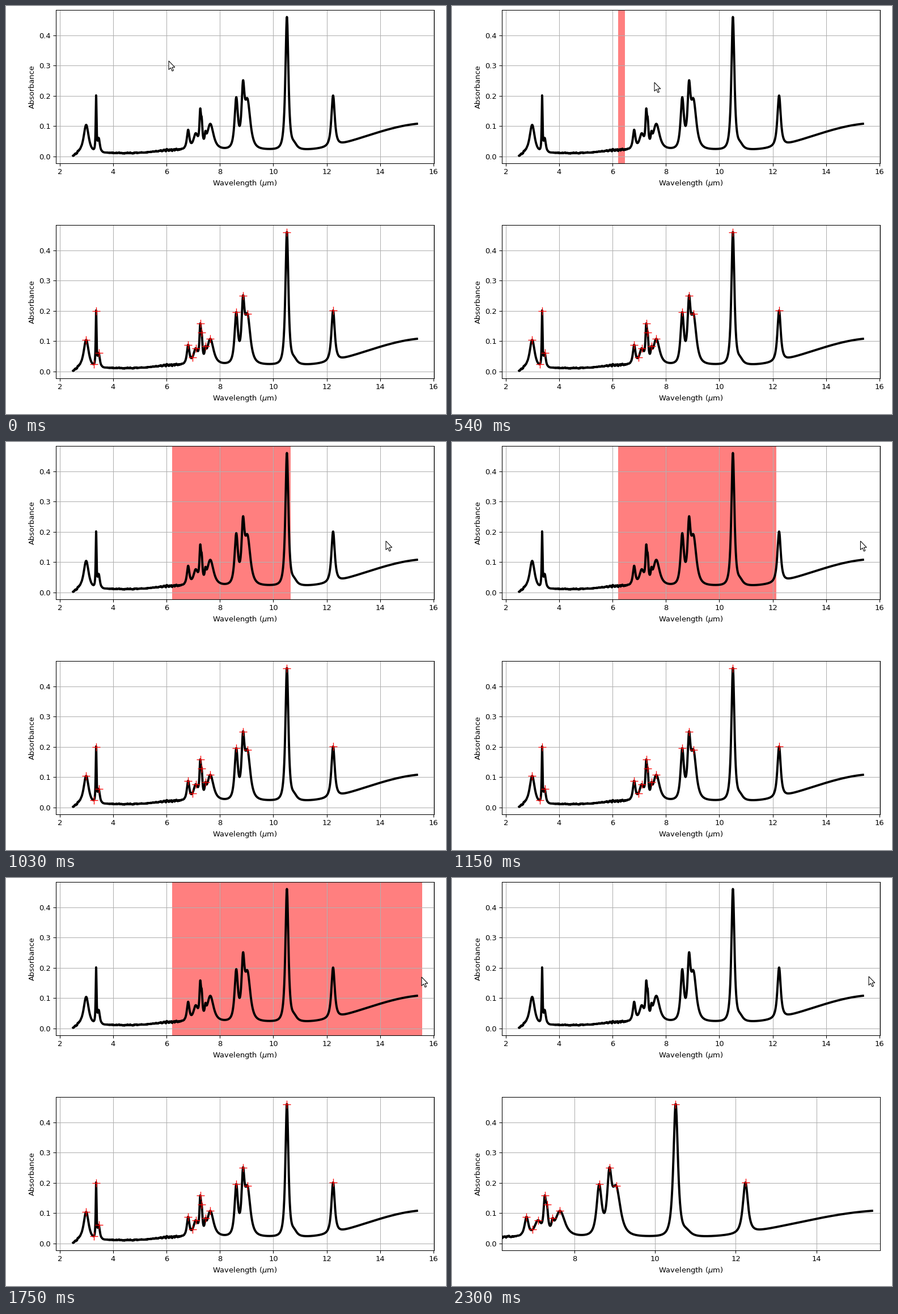
Recreate the animation shown at these times as a matplotlib script. Size 776 by 721 pixels, loop 2970 ms.

```python
import numpy as np
import matplotlib.pyplot as plt
from matplotlib.animation import FuncAnimation
from matplotlib.patches import Polygon
from matplotlib.ticker import MultipleLocator

W, H, DPI = 776, 721, 94
LOOP, STEP = 2970, 30
FULL, ZOOM = (1.856, 16.024), (6.2, 15.58)
PRESS, RELEASE = 480, 1830

plt.rcParams["font.family"] = "DejaVu Sans"

# Absorption bands: centre, absorbance there, half width
BANDS = np.array([
    (2.99, .104, .11), (3.363, .2015, .018), (3.46, .061, .05),
    (6.81, .088, .055), (7.093, .0765, .1), (7.262, .158, .033),
    (7.318, .129, .033), (7.458, .084, .03), (7.641, .1075, .14),
    (8.612, .1955, .072), (8.865, .2505, .062), (9.034, .191, .125),
    (10.51, .4605, .066), (12.24, .201, .073), (10.78, .05, .12),
])
DIPS = [3.28, 6.966]


def band(x, centre, width):
    """Bell of unit height, between a Gaussian and a Lorentzian."""
    u = (x - centre) / width
    return (1 + (2 ** (2 / 3) - 1) * u * u) ** -1.5


def hump(x, centre, width):
    return np.exp(-((x - centre) / width) ** 2)


def baseline(x):
    start = .011 * np.clip((x - 2.5) / .2, 0, 1)
    rise = .011 / (1 + np.exp((5.6 - x) / .25))
    ramp = .044 * (1 - np.cos(np.pi * np.clip((x - 11) / 4.9, 0, 1)))
    return start + rise + ramp


def spectrum():
    centre, top, width = BANDS.T
    # Band strengths that make the sum pass through each given top
    overlap = band(centre[:, None], centre, width)
    strength = np.linalg.solve(overlap, top - baseline(centre))
    x = np.linspace(2.5, 15.38, 2600)
    y = baseline(x) + band(x[:, None], centre, width) @ strength
    noise = np.random.default_rng(4).normal(size=x.size)
    noise = np.convolve(noise, np.ones(6) / 6 ** .5, "same")
    level = (.0018 * hump(x, 2.65, .12) + .0007 * hump(x, 4.6, .9)
             + .0018 * hump(x, 6.15, .4))
    return x, y + level * noise


def make_plot(top):
    ax = fig.add_axes([88 / W, 1 - (top + 271) / H, 667 / W, 271 / H])
    ax.plot(wave, absorb, color="black", lw=3)
    ax.set(xlim=FULL, ylim=(-.023, .4835), ylabel="Absorbance",
           xlabel=r"Wavelength ($\mu$m)")
    ax.xaxis.set_major_locator(MultipleLocator(2))
    ax.yaxis.set_major_locator(MultipleLocator(.1))
    ax.grid(True)
    return ax


# The small surplus keeps the pixel size from being rounded down
fig = plt.figure(figsize=((W + .01) / DPI, (H + .01) / DPI), dpi=DPI,
                 facecolor="white")
wave, absorb = spectrum()
upper, lower = make_plot(7), make_plot(387)
marks = np.append(BANDS[:-1, 0], DIPS)
lower.plot(marks, np.interp(marks, wave, absorb), "+", color="red", ms=10, mew=1)
span = upper.axvspan(ZOOM[0], ZOOM[0], color="red", alpha=.5, lw=0)
upper.set_xlim(FULL)

overlay = fig.add_axes([0, 0, 1, 1])
overlay.set(xlim=(0, W), ylim=(H, 0))
overlay.axis("off")
ARROW = np.array([(0, 0), (0, 15.5), (3.6, 12.2), (6, 18), (8.4, 17),
                  (6, 11.3), (10.8, 11.3)])
cursor = Polygon(ARROW, fc="white", ec="black", lw=.8, joinstyle="miter")
overlay.add_patch(cursor)


def pointer(t):
    if t >= RELEASE:
        return 735, 174
    times = [330, 540, 750, 1020, 1170]
    return (np.interp(t, times, [287, 357, 489, 670, 733]),
            np.interp(t, times, [97, 135, 152, 175, 175]))


def span_end(t):
    """The band trails the pointer because the plot redraws slowly."""
    return np.interp(t, [PRESS, 540, 750, 1020, 1350, 1440],
                     [ZOOM[0], 6.475, 8.01, 10.65, 14.76, ZOOM[1]])


def update(n):
    t = n * STEP
    cursor.set_xy(ARROW + pointer(t))
    span.set_visible(PRESS < t < RELEASE)
    span.set_width(span_end(t) - ZOOM[0])
    lower.set_xlim(ZOOM if t >= RELEASE else FULL)
    return cursor, span


anim = FuncAnimation(fig, update, frames=LOOP // STEP, interval=STEP,
                     repeat=True, repeat_delay=0, blit=False)
plt.show()
```
